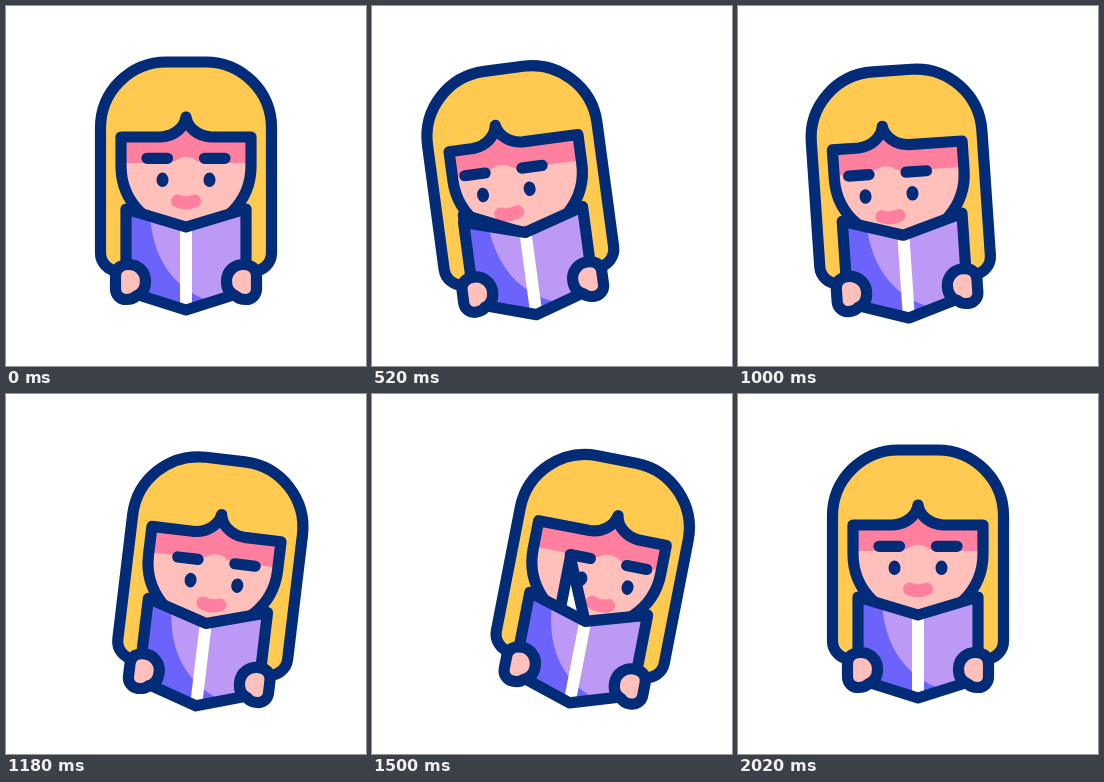
An HTML page that plays this animation: 360x360 px, repeating every 2.4 s.

```html
<!DOCTYPE html>
<html lang="en">
<head>
<meta charset="utf-8">
<title>Reading</title>
<style>
  html, body { margin: 0; width: 100%; height: 100%; overflow: hidden; background: #fff; }
  svg { display: block; width: 100vw; height: 100vh; }
  .line { stroke: #022b78; stroke-width: 11.2; stroke-linecap: round; stroke-linejoin: round; }
</style>
</head>
<body>
<svg viewBox="0 0 360 360">
  <defs>
    <clipPath id="faceClip"><path id="faceClipPath"/></clipPath>
    <path id="hand" class="line" fill="#ffc0bb"
      d="M109.500 283V270C109.500 262 115 258.500 123 258.500A16.500 16.500 0 0 1 139.500 275C139.500 283 136 288 130 290Q127 293.500 120 293.500A10.500 10.500 0 0 1 109.500 283Z"/>
  </defs>
  <g id="reader">
    <path class="line" fill="#ffca4f"
      d="M94.500 247V122A66 66 0 0 1 160.500 56H199.500A66 66 0 0 1 265.500 122V247A18 18 0 0 1 247.500 265H112.500A18 18 0 0 1 94.500 247Z"/>
    <g clip-path="url(#faceClip)">
      <path fill="#ff7f9f" d="M110 100H250V230H110Z"/>
      <path id="skin" fill="#ffc0bb"/>
    </g>
    <g id="features">
      <path class="line" fill="none" d="M141 152.300H161.500M198.500 152.300H219"/>
      <ellipse cx="156.500" cy="173.800" rx="6" ry="7.300" fill="#022b78"/>
      <ellipse cx="203.500" cy="173.800" rx="6" ry="7.300" fill="#022b78"/>
      <path d="M171.500 195Q180 198.500 188.500 195" fill="none" stroke="#ff7f9f" stroke-width="13" stroke-linecap="round"/>
    </g>
    <path id="face" class="line" fill="none"/>
    <path id="page" class="line" fill="#fff"/>
    <path fill="#6b63fa" d="M120 203L180 221L240 203V285L180 304L120 285Z"/>
    <path fill="#bb99f4" d="M144 208C146 250 166 283 206 296L240 285V203L180 221Z"/>
    <path fill="#fff" d="M174 218H186V303H174Z"/>
    <path class="line" fill="none" d="M120 203L180 221L240 203V285L180 304L120 285Z"/>
    <use href="#hand"/>
    <use href="#hand" transform="matrix(-1 0 0 1 360 0)"/>
  </g>
</svg>
<script>
  const LOOP = 2400;
  const LOOK_LAG = 30;
  const el = id => document.getElementById(id);
  const set = (id, name, value) => el(id).setAttribute(name, value);

  function ease(t, start, end) {
    const u = Math.min(1, Math.max(0, (t - start) / (end - start)));
    return u * u * (3 - 2 * u);
  }

  // Rest, lean left, lean right, back to rest.
  function sway(t, left, right) {
    return left * ease(t, 110, 600)
      + (right - left) * ease(t, 860, 1320)
      - right * ease(t, 1505, 1940);
  }

  function facePath(shift) {
    const x = 180 + shift;
    return `M115 131H${x - 25}C${x - 11} 130 ${x - 1.5} 121 ${x} 111` +
      `C${x + 1.5} 121 ${x + 11} 130 ${x + 25} 131H245V160A65 65 0 0 1 115 160Z`;
  }

  // A leaf hinged on the spine, seen above the book while it turns.
  function pagePath(turn) {
    const angle = Math.PI * turn;
    const x = 180 + 60 * Math.cos(angle);
    const y = 203 - 47 * Math.sin(angle);
    return `M180 222L${x} ${y}V${y + 82}L180 300Z`;
  }

  function draw(t) {
    const lean = sway(t, -8.2, 11);
    const slide = sway(t, -16, 16.5);
    const bob = 8 * (ease(t, 0, 950) - ease(t, 1100, 2020));
    set('reader', 'transform', `translate(${slide} ${bob}) rotate(${lean} 180 309)`);

    const lookTime = t - LOOK_LAG;
    const lookX = sway(lookTime, -15.5, 11.5);
    const lookY = 6 * (ease(t, 150, 700) - ease(t, 1510, 1980));
    set('features', 'transform', `translate(${lookX} ${lookY})`);

    const peak = sway(lookTime, -18, 12);
    const outline = facePath(peak);
    set('face', 'd', outline);
    set('faceClipPath', 'd', outline);
    const mid = 180 + peak;
    set('skin', 'd', `M100 157H${mid - 22}Q${mid - 12} 157 ${mid - 8} 153` +
      `Q${mid} 149 ${mid + 8} 153Q${mid + 12} 157 ${mid + 22} 157H260V235H100Z`);

    const turn = t < 900 ? ease(t, 90, 590) : ease(t, 1240, 1675);
    set('page', 'd', pagePath(turn));
    set('page', 'visibility', turn > 0 && turn < 1 ? 'visible' : 'hidden');
  }

  const start = performance.now();
  function tick() {
    draw((performance.now() - start) % LOOP);
    requestAnimationFrame(tick);
  }
  tick();
</script>
</body>
</html>
```
